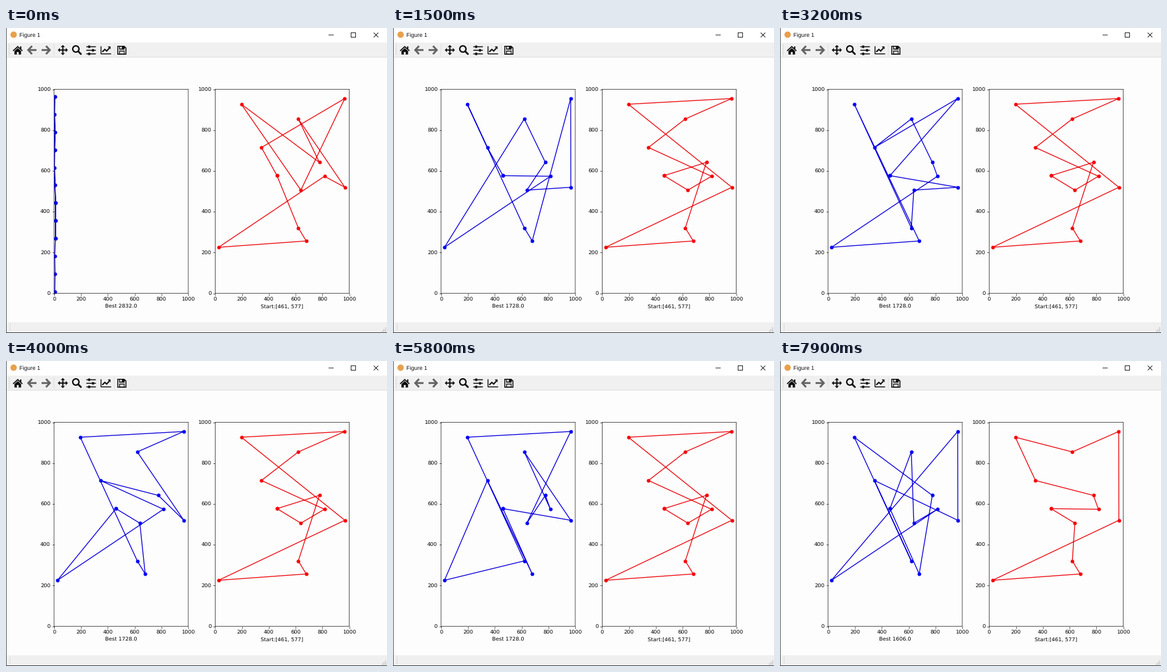
A matplotlib script that plays this animation: 600x480 px, repeating every 8000 ms.

```python
import random

import matplotlib.pyplot as plt
from matplotlib.animation import FuncAnimation
from matplotlib.patches import Circle, Polygon, Rectangle

plt.rcParams.update({"font.family": "DejaVu Sans", "text.hinting": "none",
                     "path.snap": False, "xtick.major.pad": 4.3})

FRAMES, STEP = 80, 100
DPI = 60
PT = 72 / DPI  # points per pixel
W, H = 600, 480
CANVAS, BAR, INK, GREY = "#fdfdfd", "#f0f0f0", "#0c0c0c", "#636363"

CITIES = [(461, 577), (195, 927), (966, 955), (620, 855), (345, 715),
          (777, 642), (815, 574), (967, 520), (639, 506), (620, 321),
          (679, 257), (25, 226)]

# first step -> best tour and its score
BEST = {
    0: ([0, 4, 2, 8, 1, 5, 3, 7, 6, 11, 10, 9], 2832),
    3: ([0, 6, 2, 1, 4, 3, 5, 7, 10, 9, 11, 8], 1870),
    14: ([0, 5, 9, 10, 11, 7, 1, 2, 3, 4, 6, 8], 1728),
    76: ([0, 6, 5, 4, 1, 3, 2, 7, 11, 10, 9, 8], 1606),
}


def best(step):
    return BEST[max(k for k in BEST if k <= step)]


def path(tour):
    return zip(*(CITIES[c] for c in tour + tour[:1]))


def trial(step):
    rest = list(range(1, len(CITIES)))
    random.Random(step).shuffle(rest)
    return [0] + rest


def unplaced():
    """Narrow zigzag up the axis, before the first trial tour."""
    rng = random.Random(4)
    pts = [(rng.uniform(2, 12), 965 - 87 * k) for k in range(12)]
    return zip(*(pts[8::-1] + pts))


fig = plt.figure(figsize=(W / DPI, H / DPI), dpi=DPI, facecolor=CANVAS)
win = fig.add_axes([0, 0, 1, 1])
win.set(xlim=(0, W), ylim=(H, 0))
win.axis("off")


def line(pts, color=INK, width=1.0, cap="butt"):
    win.plot(*zip(*pts), color=color, lw=width * PT, solid_capstyle=cap,
             solid_joinstyle="miter")


def poly(pts, color=INK):
    win.add_patch(Polygon(pts, fc=color, lw=0))


def rect(x, y, w, h, color=INK):
    win.add_patch(Rectangle((x, y), w, h, fc=color, lw=0))


def title_bar():
    rect(0, 0, W, 23, "#ffffff")
    win.add_patch(Circle((12, 10.5), 5, fc="#e8a04c", lw=0))
    win.text(21, 14, "Figure 1", family="Liberation Sans", fontsize=9 * PT,
             color="#111111")
    y, r = 11, 3.6
    line([(508, y), (516, y)], width=0.9)
    win.add_patch(Rectangle((547 - r, y - r), 2 * r, 2 * r, fill=False,
                            ec=INK, lw=0.9 * PT))
    for s in (-r, r):
        line([(582.7 - r, y - s), (582.7 + r, y + s)], width=0.9)


def home(x=18.5):
    line([(x - 7.3, 36), (x, 29.3), (x + 7.3, 36)], width=1.7)
    rect(x + 3.7, 29, 2, 4)
    poly([(x - 5.2, 36.3), (x, 31.6), (x + 5.2, 36.3), (x + 5.2, 41.7),
          (x - 5.2, 41.7)])
    rect(x - 1.5, 37.8, 3, 4, BAR)


def arrow(x, way, y=34.7):
    line([(x - way * 7, y), (x + way * 6, y)], GREY, 2.9)
    line([(x, y - 6.4), (x + way * 6, y), (x, y + 6.4)], GREY, 2.9)


def pan(x=89.5, y=34.7):
    for dx, dy in ((1, 0), (-1, 0), (0, 1), (0, -1)):
        bx, by = x + 4.6 * dx, y + 4.6 * dy
        line([(x, y), (bx, by)], width=2)
        poly([(x + 8 * dx, y + 8 * dy), (bx - 3.3 * dy, by + 3.3 * dx),
              (bx + 3.3 * dy, by - 3.3 * dx)])


def zoom(x=110, y=33):
    win.add_patch(Circle((x, y), 4.9, fill=False, ec=INK, lw=2.2 * PT))
    line([(x + 3.8, y + 3.8), (x + 8, y + 8)], width=2.8, cap="round")


def sliders(x=126.5):
    for k in range(3):
        y = 29.5 + 5.6 * k
        knob = x + (9 if k == 1 else 3)
        line([(x, y), (x + 15, y)], width=1.5)
        rect(knob, y - 2, 3, 4)


def chart(x=149.6, y=40.7):
    line([(x, y - 12), (x, y), (x + 16, y)], width=1.4)
    line([(x + 2, y - 3), (x + 6, y - 7), (x + 9, y - 4.5), (x + 13, y - 9)],
         width=2)
    poly([(x + 10.5, y - 11.7), (x + 15, y - 11.7), (x + 15, y - 7)])


def save(x=175.3, y=28):
    poly([(x, y), (x + 11, y), (x + 14.3, y + 3), (x + 14.3, y + 14),
          (x, y + 14)])
    rect(x + 1.5, y + 1.5, 1.4, 11, BAR)
    rect(x + 11.4, y + 3.5, 1.4, 9, BAR)
    rect(x + 4.2, y + 1.5, 3, 3, BAR)
    rect(x + 4.2, y + 9, 6, 3.3, BAR)
    rect(x + 2.5, y + 6, 9, 1.6, BAR)


def chrome():
    title_bar()
    rect(0, 23, W, 23, BAR)
    line([(0, 46), (W, 46)], "#dedede")
    for x in (75.5, 170.5):
        line([(x, 25), (x, 44)], "#dcdcdc", 0.8)
    for y in range(26, 44, 3):
        rect(4.5, y, 1.2, 1.2, "#c4c4c4")
    home()
    arrow(41, -1)
    arrow(63, 1)
    pan()
    zoom()
    sliders()
    chart()
    save()
    rect(0, 463, W, 16, BAR)
    line([(6.5, 465), (6.5, 477)], "#d8d8d8", 0.8)
    for row in range(3):
        for col in range(row + 1):
            rect(597 - 2.5 * col, 471.5 + 2.5 * row, 1.5, 1.5, "#b4b4b4")
    line([(0.5, 0), (0.5, H)], "#5c5c5c")
    line([(0, 479.5), (W, 479.5)], "#3c3c3c")


def plot_axes(x, color, dot):
    ax = fig.add_axes([x / W, 62.3 / H, 211.2 / W, 321.2 / H],
                      facecolor=CANVAS)
    ticks = range(0, 1001, 200)
    ax.set(xlim=(0, 1000), ylim=(0, 1000), xticks=ticks, yticks=ticks)
    tour, = ax.plot([], [], "o-", color=color, mfc=dot, mec=dot, lw=1.6)
    return ax, tour


chrome()
left, blue = plot_axes(75.8, "#0a00dc", "#0000f5")
right, red = plot_axes(329.4, "#ec0a10", "#f5060a")
right.set_xlabel("Start:[%d, %d]" % CITIES[0])


def update(step):
    blue.set_data(*(path(trial(step)) if step else unplaced()))
    tour, score = best(step)
    red.set_data(*path(tour))
    left.set_xlabel(f"Best {score:.1f}")
    return blue, red


anim = FuncAnimation(fig, update, frames=FRAMES, interval=STEP,
                     repeat=True, repeat_delay=0, blit=False)
plt.show()
```
